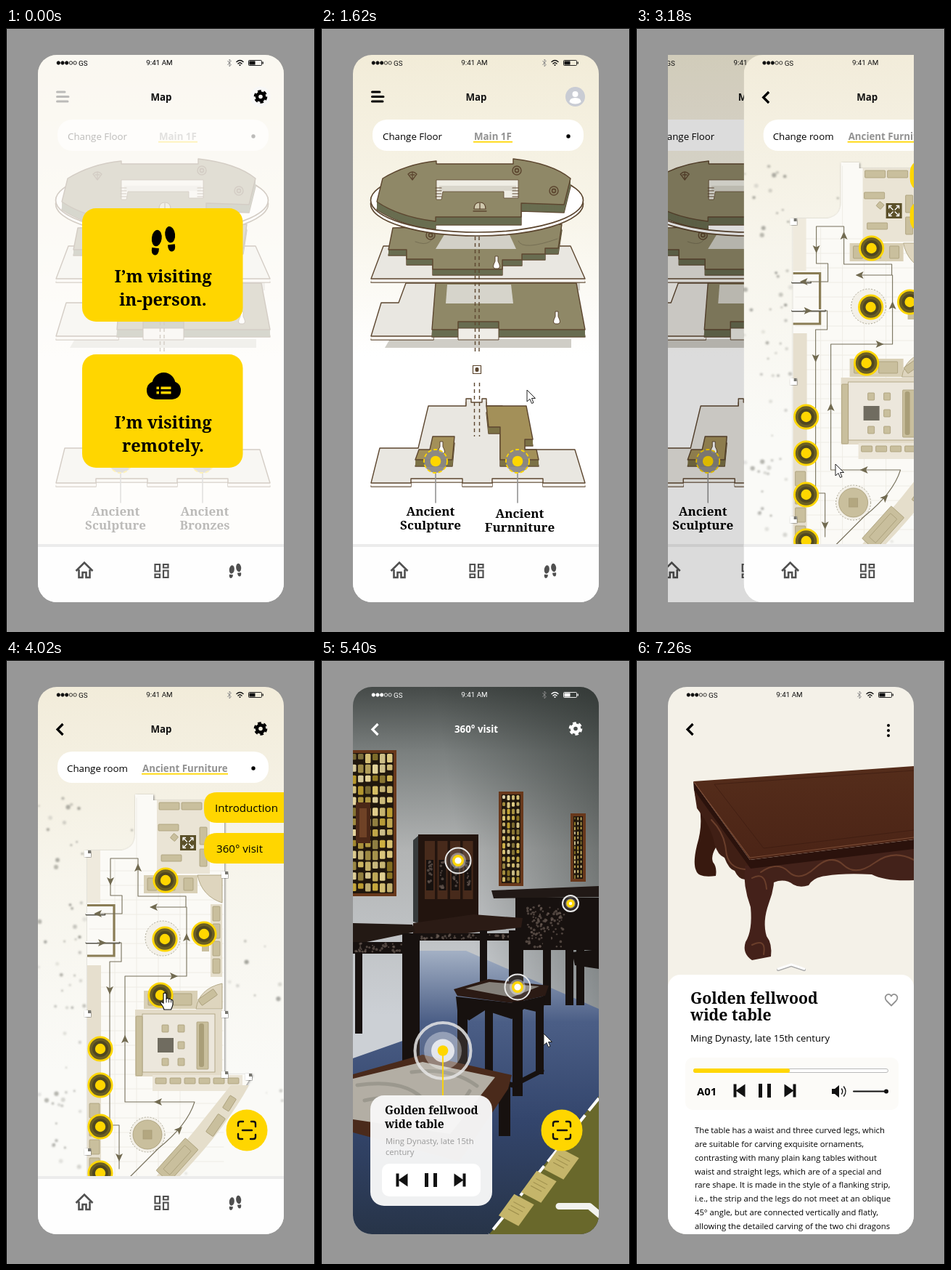
Animation of 426x831 px, one loop 9480 ms. Source, as an HTML page:

```html
<!DOCTYPE html>
<html lang="en">
<head>
<meta charset="utf-8">
<title>Museum guide walkthrough</title>
<style>
html, body { margin: 0; width: 100%; height: 100%; overflow: hidden; background: #979797; }
svg { display: block; width: 426px; height: 831px; }
text { font-family: "Open Sans", sans-serif; font-size: 13.3px; }
.bold { font-weight: 700; }
.mid { text-anchor: middle; }
.serif { font-family: "Noto Serif", serif; font-weight: 700; }
.status { font-family: Roboto, sans-serif; font-size: 9.8px; }
.line { fill: none; stroke-linecap: round; stroke-linejoin: round; }
.sharp { fill: none; stroke-linejoin: miter; }
</style>
</head>
<body>
<svg id="stage" viewBox="0 0 426 831"></svg>
<script>
const LOOP = 9480, STEP = 60;
const YELLOW = '#ffd600', OLIVE = '#8f8867', MOSS = '#696d50', GOLD = '#a39059', BROWN = '#5d4730', SLAB = '#e9e7e1';

let seed = 11;
const random = () => (seed = (seed * 16807) % 2147483647) / 2147483647;
const repeat = (n, make) => Array.from({ length: n }, (_, i) => make(i)).join('');

// Drawing helpers
const path = (d, fill, extra = '') => `<path d="${d}" fill="${fill}" ${extra}/>`;
const rect = (x, y, w, h, fill, r = 0, extra = '') =>
  `<rect x="${x}" y="${y}" width="${w}" height="${h}" rx="${r}" fill="${fill}" ${extra}/>`;
const dot = (x, y, r, fill, extra = '') => `<circle cx="${x}" cy="${y}" r="${r}" fill="${fill}" ${extra}/>`;
const stroke = (d, color, w = 2, kind = 'line', extra = '') =>
  `<path class="${kind}" d="${d}" stroke="${color}" stroke-width="${w}" ${extra}/>`;
const text = (x, y, s, cls = '', size = 13.3, color = '#000') =>
  `<text x="${x}" y="${y}" class="${cls}" fill="${color}" style="font-size:${size}px">${s}</text>`;
const lines = (x, y, gap, rows, ...style) => rows.map((s, i) => text(x, y + i * gap, s, ...style)).join('');
const at = (x, y, body, more = '') => `<g transform="translate(${x} ${y}) ${more}">${body}</g>`;
const inked = (w = 1.4) => `stroke="${BROWN}" stroke-width="${w}" stroke-linejoin="round"`;
const background = (fill, extra = '') => rect(44, 37, 339, 753, fill, 0, extra);
const screen = (id, ...parts) => `<g id="${id}"><g clip-path="url(#rounded)">${parts.join('')}</g></g>`;

// Interface parts
const gear = color => at(351, 94.5,
  dot(0, 0, 5, 'none', `stroke="${color}" stroke-width="4.4"`) +
  dot(0, 0, 7.8, 'none', `stroke="${color}" stroke-width="3" stroke-dasharray="4.6 3.568"`));
const back = color => stroke('M78.5 88L71 95.5L78.5 103', color, 3.2, 'sharp');
const foot = '<ellipse cy="-5" rx="7" ry="11.5"/><path d="M-5 9H5V13Q4 19 0 19T-5 13Z"/>';
const feet = (x, y, size, color) => at(x, y,
  `<g fill="${color}">${at(-10, 3, foot, 'rotate(7)')}${at(10, -2, foot, 'rotate(-7)')}</g>`, `scale(${size})`);
const corner = stroke('M5 12H9Q12 12 12 9V6', '#111', 2.4);
const scan = at(332, 647, dot(0, 0, 28.5, YELLOW) + stroke('M-6 0H7', '#111', 2.4) +
  repeat(4, i => `<g transform="rotate(${i * 90})">${corner}</g>`));
const skip = rect(-8, -9, 4, 18, '#111') + path('M8 -9V9L-5 0Z', '#111');
const player = (x, y, gap) => at(x, y, at(-gap, 0, skip) + at(gap, 0, skip, 'scale(-1 1)') +
  rect(-8.5, -9.5, 5, 19, '#111') + rect(3.5, -9.5, 5, 19, '#111'));

const status = color => repeat(5, i =>
    dot(72.3 + i * 5.7, 48, 2.2, i < 3 ? color : 'none', `stroke="${color}" stroke-width=".8"`)) +
  text(100, 51.5, 'GS', 'status', 9.8, color) + text(211.5, 51, '9:41 AM', 'status mid', 9.8, color) +
  stroke('M305.5 45.5l5 5l-2.5 2.5V43l2.5 2.5l-5 5', '#888', .9) +
  stroke('M318 46.5q4.5 -4 9 0M320 49q2.5 -2.5 5 0', color, 1.4) + dot(322.5, 51, 1.1, color) +
  rect(334.5, 44.5, 18, 7, 'none', 1, `stroke="${color}" stroke-width=".9"`) +
  rect(335.5, 45.5, 8, 5, color) + rect(353.5, 46.5, 1.3, 3, color);
const header = (title, color) => text(214, 99.5, title, 'bold mid', 13.3, color) + status(color);
const nav = rect(44, 711, 339, 80, '#fefefe') + rect(44, 710, 339, 4, '#ececec') +
  stroke('M96.5 747L108 735.5L119.5 747M100.5 745V756H105.5V749H110.5V756H115.5V745', '#505050', 2.6, 'sharp') +
  stroke('M205.5 738h6.5v9.5h-6.5zM217 738h6.500v4.5h-6.500zM217 746.500h6.500v9.500h-6.500zM205.500 751.500h6.500v4.500h-6.500z', '#505050', 2.2, 'sharp') +
  feet(316, 746, .5, '#505050');
const searchBar = (x, label, valueX, value, width) => rect(71, 126, 291, 43, '#fff', 20) + text(x, 154, label) +
  text(valueX, 154, value, 'bold', 13.3, '#929292') + rect(valueX - 1, 155.8, width, 1.8, YELLOW) + dot(341, 149, 2.7, '#000');
const choice = (y, word) => rect(105, y, 221.5, 156, YELLOW, 19) +
  lines(216.5, y + 102, 32, ['I’m visiting', word], 'serif mid', 23.5);

// Museum overview: every floor is an outline extruded downwards
const block = (d, depth, top = OLIVE, side = MOSS) => at(0, depth, path(d, side, inked())) +
  repeat(depth, i => at(0, depth - i - .5, path(d, side))) + path(d, top, inked());
const slab = d => block(d, 5, SLAB, '#f8f6f1');
const seal = (x, y) => dot(x, y, 6, 'none', inked(1.5)) + dot(x, y, 2.5, 'none', inked(1.8));
const vase = (x, y) => at(x, y, path('M-2 -8h4v7q5 9 0 10h-4q-5 -1 0 -10z', '#fff', inked(1)));
const disc = y => `<ellipse cx="215" cy="${y}" rx="146.5" ry="44" fill="#fff" ${inked(1.7)}/>`;
const pin = x => stroke(`M${x} 612V653`, '#949494', 1.6) + dot(x, 596, 16, '#8b8985', 'fill-opacity=".92"') +
  dot(x, 596, 16, 'none', `stroke="${YELLOW}" stroke-width="1.8" stroke-dasharray="5 3"`) + dot(x, 596, 7.3, YELLOW);
const label = (x, y, word) => lines(x, y, 19, ['Ancient', word], 'serif mid', 17);

const museum =
  path('M95 428H345V440H88Z', '#cfcdc6') + rect(160, 343, 197, 18, '#d0cec7') +
  slab('M117 351H160L155 424H69L83 378H107Z') + block('M158 351H352L364 415H245V404H189V415H153Z', 10) +
  path('M174 353H262L265 379H172Z', '#d6d4cb') + rect(189, 413, 56, 16, '#efede7', 0, inked(1)) + vase(325, 398) +
  slab('M86 300H344L364 345H69Z') +
  block('M99 275L332 270L327 303H309V311H277V319H250V332H154V318H118V305H93Z', 8) +
  path('M175 276H256L269 304H158Z', '#d2d0c7') + stroke('M130 294Q156 304 156 276M326 290Q278 307 272 293', '#766f54', 1) +
  vase(242, 322) + seal(151, 285) + disc(242) + disc(237) +
  block('M85 207Q118 187 159 183V187H265V180Q318 186 344 207L335 243L276 241V260H158V266Q108 260 77 239Z', 11) +
  path('M159 209H272V234H252V225H168L166 236H159Z', '#efede4', inked(.8)) + rect(163, 217, 106, 7, '#dad7cc') +
  stroke(repeat(4, i => `M158 ${220 + i * 4}h8m98 0h8`), BROWN, 1.2) + seal(270, 196) + seal(321, 224) +
  stroke('M120 201q6 -6 12 0l-6 8zm3 1h6m-3 -4v10', BROWN, 1.3) +
  path('M211 249q0 -9 8 -9t8 9Z', '#cfc8ad', inked(1.2)) + stroke('M219 241V249M210 252H228', BROWN, 1.3) +
  slab('M148 520H200V510H207V515H222V510H228V520H250L262 580H350L364 626H306V620H236V626H195V620H124V626H69L81 578H134Z') +
  block('M228 520H283L292 566H281V580H297L300 594H247V549H231Z', 9, GOLD, '#7d7347') +
  block('M154 562H184L181 594H130L135 580H150Z', 9, GOLD, '#7d7347') + vase(166, 577) +
  stroke('M212.5 287V446M218 287V446M211.5 488V562M218.5 488V562', BROWN, 1.4, 'sharp', 'stroke-dasharray="5 4"') +
  rect(209.5, 464.5, 11, 11, '#fff', 0, inked(1.2)) + rect(212.5, 467, 5, 6, BROWN, 2) + pin(158) + pin(271);

const mapScreen = screen('map', background('url(#cream)'), museum, label(151, 671, 'Sculpture'),
  `<g id="bronzes">${label(274, 671, 'Bronzes')}</g><g id="furniture">${label(274, 674, 'Furnniture')}</g>`,
  searchBar(85, 'Change Floor', 211, 'Main 1F', 54), stroke('M70.5 88H81M70.5 94.5H86M70.5 101H85', '#000', 3),
  dot(350.5, 94.5, 13.5, '#c9ccd4'), dot(350.5, 91, 4, '#fff'), path('M342.5 102q0 -6 8 -6t8 6q-8 5 -16 0Z', '#fff'),
  header('Map', '#111'), nav,
  `<g id="veil">${rect(44, 37, 339, 673, '#fefdfa', 0, 'fill-opacity=".74"')}${dot(350.5, 94.5, 14, '#f8f8f7')}
    ${gear('#000')}${header('Map', '#111')}${choice(248, 'in-person.')}${feet(217, 291, .98, '#000')}${choice(449, 'remotely.')}
    ${dot(217.5, 490, 16, '#000')}${rect(194, 486, 47, 25, '#000', 12)}
    ${repeat(2, i => rect(207.5, 493.5 + i * 6.5, 3.5, 3.5, YELLOW) + rect(213.5, 493.5 + i * 6.5, 14, 3.5, YELLOW))}</g>`,
  background('#000', 'id="shade" opacity="0"'));

// Room plan
const TAN = '#c9bf9d', EDGE = 'stroke="#a79c77" stroke-width=".8"';
const row = (n, x, y, dx, dy, w, h) => repeat(n, i => rect(x + i * dx, y + i * dy, w, h, TAN, 1, EDGE));
const turned = (x, y, w, h, angle) => at(x, y, rect(-w / 2, -h / 2, w, h, TAN, 1, EDGE), `rotate(${angle})`);
const stop = (x, y) => dot(x, y, 16.2, '#6b5f24', `stroke="${YELLOW}" stroke-width="2.8"`) +
  dot(x, y, 11, '#4f4720') + dot(x, y, 7.2, YELLOW);
const arrow = (x, y, angle) => at(x, y, path('M7 0L-4 -5L-1.5 0L-4 5Z', '#716a50'), `rotate(${angle})`);
const dashedRing = (x, y) => dot(x, y, 24, '#f3f0e8', 'stroke="#aaa694" stroke-dasharray="2 2"');
const bracket = (x, y) => rect(x - 5, y - 4, 9, 9, '#fff', 0, 'filter="url(#shadow)"') + rect(x, y - 4, 4, 4, '#77766f');

const roomPlan =
  path('M178 185H203V193H301V570H340Q300 640 205 725H112V262H160Q178 258 178 240Z', '#fbfaf6', 'filter="url(#shadow)"') +
  stroke('M150 275V714M180 190V714M210 300V714M240 320V640' + repeat(21, i => `M${115 + i % 2 * 10} ${290 + i * 20}H300`), '#eeece5', 1) +
  rect(208, 193, 73, 101, '#eae4d5') + rect(112, 262, 18, 72, '#efeadd') + rect(112, 420, 19, 300, '#e6dfce') +
  rect(282, 336, 16, 100, '#e5decb') + rect(178, 481, 120, 92, '#e3dbc8') + rect(188, 487, 100, 80, '#ece7dc', 0, EDGE) +
  rect(202, 571, 124, 22, '#ebe5d7') + path('M335 585Q300 650 225 725H195L262 645Q290 610 310 585Z', '#e5decb') +
  repeat(2, i => rect(190, 296 + i * 159, 74, 25, '#d9d0b6')) +
  path('M264 296h34v38q-28 -9 -34 -38zM262 480q4 -28 36 -35v35z', '#ded5be', EDGE) +
  row(2, 211, 196, 31, 0, 28, 10) + row(2, 210, 226, 4, 42, 28, 9) + row(2, 267, 230, 0, 30, 10, 24) + row(3, 195, 300, 25, 0, 13, 17) +
  row(4, 285, 339, 0, 24, 10, 20) + rect(270, 365, 10, 36, TAN) + row(2, 196, 459, 34, 0, 26, 16) +
  repeat(3, i => row(2, 215, 502 + i * 23, 22, 0, 9, 10)) + row(1, 179, 490, 0, 0, 9, 82) + row(1, 263, 498, 0, 0, 16, 65) +
  row(6, 206, 575, 20, 0, 15, 8) + row(4, 115, 610, 0, 25, 14, 20) + rect(209, 520, 22, 20, '#706c60') + rect(266, 500, 7, 60, '#a99e78', 3) +
  turned(232, 244, 8, 8, 40) + turned(278, 464, 26, 10, -35) + turned(236, 688, 60, 24, -48) + turned(236, 688, 44, 12, -48) +
  turned(289, 640, 30, 12, -55) + turned(308, 610, 20, 10, -58) +
  rect(240, 241, 22, 21, '#5b5029') + at(251, 251.5, repeat(4, i => `<g transform="rotate(${i * 90})">${stroke('M1.5 1.5L7 7M3.5 7H7V3.5', '#fff', 1.3)}</g>`)) +
  dashedRing(216, 383) + dashedRing(195, 653) + dot(195, 653, 20, TAN, EDGE) + rect(189, 647, 12, 12, '#b3a780', 0, EDGE) +
  stroke('M112 337.5H149V407H112', '#8a7d55', 3.2, 'sharp') +
  repeat(2, i => stroke(`M111 ${350 + i * 39}H${136 + i * 20}`, '#55534a', 3) + stroke(`M111 ${349 + i * 39}H${135 + i * 20}`, '#fff', 2)) +
  [266, 486, 676].map(y => bracket(113, y)).join('') + [295, 487, 570].map(y => bracket(302, y)).join('') + bracket(335, 573) +
  stroke('M182 325V273H144V324H160V349H128M126 389H159V415H143V640H156V700M182 325H248V340H200M249 435V340M249 435H164V608H260Q250 640 210 672L168 714', '#77715c', 1.1) +
  arrow(144, 303, 90) + arrow(182, 287, -90) + arrow(128, 349, 180) + arrow(131, 389, 0) + arrow(205, 340, 180) +
  arrow(249, 383, -90) + arrow(230, 435, 0) + arrow(143, 453, 90) + arrow(164, 523, -90) + arrow(211, 608, 180) +
  arrow(238, 647, -45) + arrow(156, 683, 90) +
  stop(220, 303) + stop(219, 384) + stop(273, 377) + stop(213, 461) + repeat(4, i => stop(130, 535 + 46.5 * i + 3.5 * i * i));
const specks = repeat(90, i => dot(45 + random() * (i % 2 ? 66 : 336), 190 + random() * 520, 1.2 + random() * 2,
  '#77776f', `opacity="${.15 + random() * .5}"`));
const tab = (y, x, name) => path(`M383 ${y}H291q-18 0 -18 18v6q0 18 18 18H383Z`, YELLOW) + text(x, y + 27, name, '', 15.1);
const roomScreen = screen('room', background('url(#stone)'), `<g filter="url(#blur)">${specks}</g>`, roomPlan,
  tab(182, 288, 'Introduction'), tab(238, 290, '360° visit'), scan,
  searchBar(84, 'Change room', 188, 'Ancient Furniture', 119), back('#000'), gear('#000'), header('Map', '#111'), nav);

// Gallery photo in flat tones
const WOOD = '#17110f';
const lattice = (x, y, w, h, cols) => rect(x - 4, y - 4, w + 8, h + 8, '#68381b') + rect(x, y, w, h, '#20170d') +
  repeat(cols * 13, i => rect(x + 1 + i % cols * w / cols, y + 1 + Math.floor(i / cols) * h / 13, w / cols - 2.5, h / 13 * (.5 + random() * .4),
    `hsl(47 ${35 + random() * 25}% ${32 + random() * 45}%)`, 1.5));
const carved = (x, y, w, h) => rect(x, y, w, h, WOOD) +
  repeat(w * h / 30, () => dot(x + 2 + random() * (w - 4), y + 2 + random() * (h - 4), 1 + random(), '#685a52', 'opacity=".7"'));
const legs = (y, h, w, ...xs) => xs.map(x => rect(x, y, w, h, WOOD)).join('');
const ring = (x, y, r) => dot(x, y, r, '#fff', 'fill-opacity=".12" stroke="#e9e9e9" stroke-width="2"') +
  dot(x, y, r * .62, '#fff', 'fill-opacity=".4"') + dot(x, y, r * .36, '#fff', `stroke="${YELLOW}" stroke-width="3.4"`);
const note = i => at(268 + i * 31, 756 - i * 32, rect(-14, -18, 31, 36, '#c5b56a') +
  stroke('M-8 -8H9M-8 -2H10M-8 4H8', '#9d8e4c', 1), 'rotate(28) skewX(-8)');
const photo =
  background('url(#wall)') + background('url(#corner)') +
  path('M44 548L118 522L136 400H200L383 480V791H44Z', 'url(#floor)') +
  lattice(40, 128, 60, 193, 6) + rect(48, 196, 20, 56, '#4b2817') + rect(53, 204, 10, 40, '#6f4226') +
  lattice(249, 185, 26, 122, 4) + lattice(348, 215, 13, 86, 3) +
  path('M235 317L383 311V326L238 328Z', '#211916') + rect(268, 327, 115, 72, WOOD) + carved(281, 335, 56, 62) +
  legs(380, 95, 11, 268, 306, 337, 352) + path('M346 402L383 398V425L350 420Z', WOOD) +
  path('M127 248L135 241V362L127 360Z', '#373b3c') + rect(134, 240, 83, 122, '#22140e') +
  repeat(4, i => rect(143 + i * 17.5, 249, 14, 80, '#472a1b') + carved(145 + i * 17.5, 275, 10, 42)) +
  path('M127 362L210 350L278 355L276 368L127 384Z', '#2b1b15') + carved(136, 376, 130, 10) + legs(372, 72, 10, 219, 259) +
  path('M44 362L126 364L130 374L44 392Z', '#231914') + carved(44, 388, 78, 16) + legs(376, 178, 24, 112) + legs(402, 112, 10, 47) +
  path('M183 453L231 439L314 448L309 462L264 472L188 462Z', '#2b1a14') + path('M199 452L232 443L301 449L263 464Z', '#85817b') +
  path('M186 463L264 472L309 462L306 486L280 480L263 494L226 482L204 496L188 482Z', WOOD) +
  legs(470, 130, 14, 188, 264) + legs(470, 100, 11, 226, 296) + stroke('M196 568L265 585L304 565', WOOD, 7) +
  legs(580, 75, 16, 245) + path('M44 570L140 543L263 571L258 590L191 690L44 650Z', '#4a2a1b') + path('M44 576L140 553L240 574L178 652L44 632Z', '#b3aea4') +
  stroke('M50 585Q120 575 146 610T205 593M60 606Q120 592 140 635M125 567Q180 560 215 586', '#77756c', 5, 'line', 'opacity=".4"') +
  path('M383 600L232 790H383Z', '#69682b') + stroke('M383 603L232 790', '#fff', 4, 'sharp', 'stroke-dasharray="22 8"') +
  repeat(3, note) + stroke('M328 751.5H370L385 764', '#f2f2ee', 9);
const visitScreen = screen('visit', photo, ring(189, 276, 17.5), ring(344, 335, 11), ring(271, 450, 17.5),
  dot(168, 537.5, 38.5, '#fff', 'fill-opacity=".1" stroke="#e6e6e6" stroke-width="4" stroke-opacity=".85"'),
  dot(168, 537.5, 26, '#fff', 'fill-opacity=".35"'), dot(168, 537.5, 16, '#fff', 'fill-opacity=".75"'),
  stroke('M168 538V600', YELLOW, 1.8), dot(168, 537.5, 7.3, YELLOW),
  rect(68, 599, 168, 152, '#f7f7f7', 19, 'fill-opacity=".97"'), rect(84, 693, 136, 45, '#fff', 10),
  lines(88, 625, 19, ['Golden fellwood', 'wide table'], 'serif', 15.5),
  lines(89, 666, 15, ['Ming Dynasty, late 15th', 'century'], '', 11.2, '#999'),
  player(151.5, 715.5, 40), scan, back('#fff'), gear('#fff'), header('360° visit', '#fff'));

// Object detail
const story = ['The table has a waist and three curved legs, which', 'are suitable for carving exquisite ornaments,',
  'contrasting with many plain kang tables without', 'waist and straight legs, which are of a special and',
  'rare shape. It is made in the style of a flanking strip,', 'i.e., the strip and the legs do not meet at an oblique',
  '45° angle, but are connected vertically and flatly,', 'allowing the detailed carving of the two chi dragons'];
const woodenTable =
  path('M81 185Q96 215 84 255Q78 280 83 290Q86 300 110 297Q112 285 106 278Q103 270 110 258V220Z', '#38190f') +
  path('M80 178L158 285L152 302Q142 303 136 290Q128 288 122 272Q112 268 108 252Q104 230 84 204Z', '#401f15') +
  path('M150 283H190Q193 310 183 335Q174 360 180 380Q188 390 186 408L160 413Q146 404 151 388Q161 372 158 340Q147 310 150 283Z', '#44211a') +
  path('M158 284L383 258V303Q345 305 325 295Q285 293 262 297Q244 299 238 310Q226 314 217 309Q205 300 190 306Z', '#43221a') +
  stroke('M172 292Q195 276 210 291T247 286T286 282T329 279T383 275M160 300Q178 290 180 315M160 392Q180 382 176 405M104 220Q122 238 124 262T150 288', '#6a3e2b', 2) +
  path('M79 167L157 275L383 247V260L158 287L80 179Z', '#2b120c') + path('M79 167L383 146V247L157 275Z', 'url(#wood)') +
  stroke('M80 168L157 272L383 244', '#7a4a33', 1.2) + stroke('M383 152L108 171L176 259L383 234', '#3a1a10', 1, 'line', 'opacity=".6"');
const detailScreen = screen('detail', background('#f4f1e8'), woodenTable,
  stroke('M196 426L214 420L232 426', '#aaa', 4), stroke('M196 425L214 419L232 425', '#fff', 3),
  rect(44, 433, 339, 400, '#fff', 17), rect(68, 547, 294, 72, '#fcfbf8', 10),
  lines(75, 473, 23, ['Golden fellwood', 'wide table'], 'serif', 21.2), text(75, 525, 'Ming Dynasty, late 15th century', '', 13.1),
  stroke('M352 475.5l-6.5 -6.500q-4 -5 .5 -8.500q4 -2 6 2q2 -4 6 -2q4.500 3.500 .5 8.500z', '#929292', 1.8),
  rect(79.5, 562.5, 268, 5, '#fff', 2.5, 'stroke="#aaa" stroke-width=".8"'), rect(79, 562, 133, 6, YELLOW, 3),
  text(84, 599, 'A01', 'bold', 14.8), player(177.5, 592.5, 35),
  path('M270 590h4l6 -5v17l-6 -5h-4z', '#111'), stroke('M283.5 590q2.500 3.500 0 7m3 -10q5 6.500 0 13', '#111', 1.4),
  stroke('M300 593.5H345', '#111', 2), dot(345, 593.5, 3, '#111'),
  lines(81, 651, 18.86, story, '', 11.25), back('#000'), repeat(3, i => dot(348, 90 + i * 7, 2, '#000')), status('#111'));

const gradient = (id, stops) => `<linearGradient id="${id}" x2="0" y2="1">` +
  stops.map(([offset, color]) => `<stop offset="${offset}" stop-color="${color}"/>`).join('') + '</linearGradient>';
document.getElementById('stage').innerHTML = `<defs>
  ${gradient('cream', [[0, '#f2ecd8'], [.3, '#f8f5ea'], [.55, '#fff']])}
  ${gradient('stone', [[0, '#f2ecda'], [.35, '#f7f5ec'], [.7, '#fafaf7']])}
  ${gradient('wall', [[0, '#454a48'], [.12, '#7b807f'], [.3, '#b2b4b4'], [.6, '#ccd0d5']])}
  ${gradient('floor', [[0, '#a3b0c4'], [.25, '#4b5e86'], [.6, '#33456c'], [1, '#273448']])}
  ${gradient('wood', [[0, '#552d1b'], [1, '#4b2416']])}
  <linearGradient id="corner" y1=".35" x2="1" y2="0"><stop offset=".4" stop-color="#252b28" stop-opacity="0"/><stop offset="1" stop-color="#252b28" stop-opacity=".55"/></linearGradient>
  <clipPath id="viewport">${background('#000')}</clipPath>
  <clipPath id="rounded"><rect x="44" y="37" width="339" height="753" rx="26"/></clipPath>
  <filter id="blur"><feGaussianBlur stdDeviation=".8"/></filter>
  <filter id="shadow"><feDropShadow dx="1" dy="1" stdDeviation="1.5" flood-color="#555" flood-opacity=".7"/></filter></defs>
  ${rect(0, 0, 426, 831, '#979797')}${stroke('M.5 831V.5H425.5V831', '#000', 1, 'sharp')}
  <g clip-path="url(#viewport)">${mapScreen}${roomScreen}${visitScreen}${detailScreen}</g>
  <g id="cursor"><g id="pointer">${path('M0 0V16L4 12.5L6.500 18.500L9 17.500L6.500 11.500H11.500Z', '#fff', 'stroke="#222"')}</g>
  <g id="hand">${path('M-2 1q2 -2 4 0v7q2 -1.500 3.500 .5q2 -1 3 1q2.500 -.5 2.500 2.500v4q-.5 3 -2.500 7H-1q-1 -4 -5 -9q-.5 -3 4 0z', '#fff', 'stroke="#111" stroke-width="1.2"')}${stroke('M2 8v5m3.5 -4v4m3 -3v3', '#111', .9)}</g></g>`;

// Timeline
const $ = id => document.getElementById(id);
const progress = (t, from, to) => Math.min(1, Math.max(0, (t - from) / (to - from)));
const smooth = u => u * u * (3 - 2 * u);
const easeOut = u => 1 - (1 - u) ** 2;
const show = (id, opacity) => {
  $(id).style.display = opacity > 0 ? '' : 'none';
  $(id).setAttribute('opacity', Number(opacity));
};
const move = (id, x, y) => $(id).setAttribute('transform', `translate(${x} ${y})`);

// Each cursor move: start, end, destination
const moves = [[480, 540, 377, 331], [660, 1020, 284, 498], [2040, 2400, 275, 600], [3300, 4020, 219, 458],
  [5100, 5400, 307, 514], [5400, 6000, 250, 585], [6180, 6600, 191, 639], [6900, 7200, 377, 560]];

function draw(t) {
  const reveal = smooth(progress(t, 1260, 1620));
  const slide = easeOut(progress(t, 2880, 3555));
  const visit = smooth(progress(t, 4500, 4860));
  const detail = smooth(progress(t, 6900, 7260));
  show('veil', 1 - reveal);
  show('bronzes', 1 - reveal);
  show('furniture', reveal);
  show('map', slide < 1);
  show('room', slide > 0 && visit < 1);
  show('visit', detail < 1 ? visit : 0);
  show('detail', detail);
  move('map', -85 * slide, 0);
  move('room', 339 * (1 - slide), 0);
  $('shade').setAttribute('opacity', .2 * slide);

  let x = 397, y = 262;
  for (const [from, to, endX, endY] of moves) {
    const u = smooth(progress(t, from, to));
    x += (endX - x) * u;
    y += (endY - y) * u;
  }
  const pointing = (t >= 2400 && t < 2940) || (t >= 3960 && t < 4620);
  move('cursor', x, y);
  show('cursor', t >= 480 && t < 7260);
  show('hand', pointing);
  show('pointer', !pointing);
}

const start = performance.now();
function tick() {
  const t = (performance.now() - start) % LOOP;
  draw(Math.floor(t / STEP) * STEP);
  requestAnimationFrame(tick);
}
tick();
</script>
</body>
</html>
```
